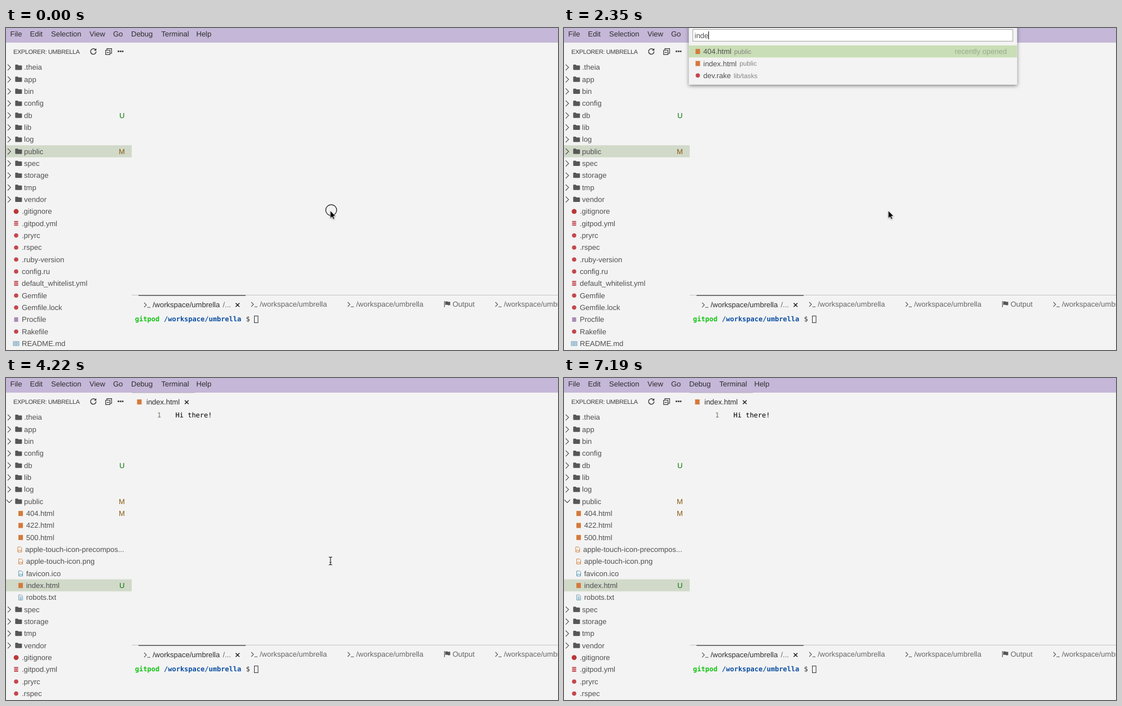
Recreate the animation shown at these times as an HTML page. Size 979 by 572 pixels, loop 7.3 s.

```html
<!DOCTYPE html>
<html lang="en">
<head>
<meta charset="utf-8">
<title>Quick open</title>
<style>
html, body { margin: 0; width: 100%; height: 100%; overflow: hidden; background: #f3f3f3; }
svg { display: block; }
text { font: 13px "Liberation Sans", Arial, sans-serif; fill: #505050; white-space: pre; text-rendering: geometricPrecision; }
.dark { fill: #2e2e2e; }
.grey { fill: #666; }
.small { font-size: 11.7px; fill: #858585; }
.title { font-size: 10.8px; letter-spacing: -.3px; fill: #3c3c3c; }
.mono { font: 12px "DejaVu Sans Mono", "Liberation Mono", monospace; fill: #000; }
.bold { font-weight: bold; }
.hint { fill: #9aa78d; text-anchor: end; }
.group { fill: #a3a3a3; text-anchor: end; }
.line { fill: none; stroke: #444; stroke-width: 1.1; }

.t { animation: 7300ms step-end infinite; }
#ring { animation-name: ring; }
#keys { animation-name: keys; }
#quick { animation-name: quick; }
#holder { animation-name: holder; }
#recent { animation-name: recent; }
#found { animation-name: found; }
#match { animation-name: match; }
#k1 { animation-name: k1; }
#k2 { animation-name: k2; }
#k3 { animation-name: k3; }
#k4 { animation-name: k4; }
#bar { animation-name: bar; }
#closed { animation-name: closed; }
#open { animation-name: open; }
#sel { animation-name: sel; }
#tab { animation-name: tab; }
#code { animation-name: code; }
#caret { animation-name: caret; }
#mouse { animation-name: mouse; }
#arrow { animation-name: arrow; }
#beam { animation-name: beam; }
#hand { animation-name: hand; }

@keyframes ring { 0% { opacity: 1 } 1.23%, 100% { opacity: 0 } }
@keyframes keys { 0% { opacity: 0 } 12.6% { opacity: 1 } 18.76%, 100% { opacity: 0 } }
@keyframes quick { 0% { opacity: 0 } 13.83% { opacity: 1 } 43.56%, 100% { opacity: 0 } }
@keyframes holder { 0% { opacity: 1 } 27.25%, 100% { opacity: 0 } }
@keyframes recent { 0% { opacity: 1 } 34.93%, 100% { opacity: 0 } }
@keyframes found { 0% { opacity: 0 } 34.93% { opacity: 1 } 37.39%, 100% { opacity: 0 } }
@keyframes match { 0% { opacity: 0 } 37.39%, 100% { opacity: 1 } }
@keyframes k1 { 0% { fill-opacity: 0 } 27.25%, 100% { fill-opacity: 1 } }
@keyframes k2 { 0% { fill-opacity: 0 } 29.72%, 100% { fill-opacity: 1 } }
@keyframes k3 { 0% { fill-opacity: 0 } 32.19%, 100% { fill-opacity: 1 } }
@keyframes k4 { 0% { fill-opacity: 0 } 33.83%, 100% { fill-opacity: 1 } }
@keyframes bar {
  0% { opacity: 1; transform: translateX(232px) }
  19.86% { opacity: 0; transform: translateX(232px) }
  27.25% { opacity: 1; transform: translateX(235px) }
  29.72% { opacity: 1; transform: translateX(249px) }
  32.19% { opacity: 1; transform: translateX(256px) }
  33.83% { opacity: 1; transform: translateX(263px) }
  41.09%, 100% { opacity: 0; transform: translateX(263px) }
}
@keyframes closed { 0% { opacity: 1 } 52.6%, 100% { opacity: 0 } }
@keyframes open { 0% { opacity: 0 } 52.6%, 100% { opacity: 1 } }
@keyframes sel { 0% { transform: none } 54.1%, 100% { transform: translateY(149.3px) } }
@keyframes tab { 0% { opacity: 0 } 49.72%, 100% { opacity: 1 } }
@keyframes code { 0% { opacity: 0 } 51.23%, 100% { opacity: 1 } }
@keyframes caret {
  0% { opacity: 0 } 51.23% { opacity: 1 } 57.8% { opacity: 0 } 63.97% { opacity: 1 } 71.78% { opacity: 0 }
  79.04% { opacity: 1 } 85.34% { opacity: 0 } 92.6% { opacity: 1 } 98.49%, 100% { opacity: 0 }
}
@keyframes mouse {
  0% { transform: translate(575.5px, 325px) }
  63.97% { transform: translate(575px, 326px) }
  65.47% { transform: translate(530px, 342px) }
  66.84% { transform: translate(445.5px, 363.5px) }
  68.9% { transform: translate(234.5px, 382px) }
  71.78% { transform: translate(160px, 383px) }
  73.15% { transform: translate(108px, 382px) }
  74.65% { transform: translate(74px, 378px) }
  76.02% { transform: translate(58px, 374px) }
  77.53% { transform: translate(50px, 371px) }
  79.04% { transform: translate(46px, 369px) }
  80.54% { transform: translate(43px, 368px) }
  82.05% { transform: translate(42px, 367px) }
  85.34% { transform: translate(120px, 376px) }
  86.98% { transform: translate(720.5px, 452px) }
  88.9% { transform: translate(872.5px, 518px) }
  92.6%, 100% { transform: translate(887.5px, 556.5px) }
}
@keyframes arrow { 0% { opacity: 1 } 51.23%, 100% { opacity: 0 } }
@keyframes beam { 0% { opacity: 0 } 51.23% { opacity: 1 } 71.78% { opacity: 0 } 86.98% { opacity: 1 } 94.79%, 100% { opacity: 0 } }
@keyframes hand { 0% { opacity: 0 } 71.78% { opacity: 1 } 86.98%, 100% { opacity: 0 } }
</style>
</head>
<body>
<svg width="979" height="572" viewBox="0 0 979 572">
  <defs>
    <filter id="soft" x="-10%" y="-20%" width="120%" height="150%"><feDropShadow dx="0" dy="2" stdDeviation="3" flood-opacity=".5"/></filter>
    <filter id="glow" x="-10%" y="-10%" width="120%" height="120%"><feDropShadow dx="0" dy="0" stdDeviation="1.5" flood-opacity=".5"/></filter>
    <filter id="drop" x="-50%" y="-50%" width="200%" height="200%"><feDropShadow dx="0" dy="1" stdDeviation="1" flood-opacity=".35"/></filter>
    <path id="folder" d="M-6-4q0-1 1-1h3.4L-.2-3.6H5q1 0 1 1v6q0 1-1 1H-5q-1 0-1-1z" fill="#575757"/>
    <path id="shut" class="line" d="M-2.7-5.2 2.5 0l-5.2 5.2"/>
    <path id="down" class="line" d="M-5-2.6 0 2.5l5-5.1"/>
    <circle id="git" r="4.4" fill="#b9383a"/>
    <circle id="ruby" r="3.8" fill="#c4474d"/>
    <rect id="proc" x="-3.5" y="-4" width="7" height="8" fill="#a78ab5"/>
    <rect id="html" x="-4" y="-4.5" width="8" height="9" fill="#d57a3c"/>
    <g id="yml" fill="#c65a60"><rect x="-3.8" y="-4.6" width="7.6" height="2.4" rx="1"/><rect x="-3.8" y="-1.5" width="7.6" height="2.4" rx="1"/><rect x="-3.8" y="1.6" width="7.6" height="2.4" rx="1"/></g>
    <g id="book"><rect x="-5" y="-3.5" width="10" height="7" fill="#cfe1ea" stroke="#6e9fb8"/><path d="M0-3.5v7M-3.5-1.2h2m3 0h2M-3.5 1h2m3 0h2" stroke="#6e9fb8"/></g>
    <path id="image" d="M-3.5-4.5h5l2 2v7h-7zM-3 3.5-1 .5 1 2.2 2.2 1 3 3.5" fill="none"/>
    <use id="img" href="#image" stroke="#d58a4c"/>
    <use id="ico" href="#image" stroke="#5f9dbb"/>
    <path id="txt" d="M-3.5-4.5h5l2 2v7h-7zM-2-1h4M-2 1h4M-2 3h4" fill="none" stroke="#6fa3bd"/>
    <path id="term" d="M0-4 4 0 0 4M5.5 4.3H11" fill="none" stroke="#555" stroke-width="1.1"/>
    <path id="cross" d="M-3.3-3.3 3.3 3.3M3.3-3.3-3.3 3.3" stroke="#1c1c1c" stroke-width="1.5"/>
    <path id="rod" d="M-3-7Q0-7 0-5.5V5.5Q0 7-3 7M3-7Q0-7 0-5.5V5.5Q0 7 3 7M-1.5 2.5h3"/>
  </defs>

  <rect width="979" height="572" fill="#f3f3f3"/>
  <rect width="979" height="26" fill="#c4b7d7"/>
  <g id="menu"></g>

  <text class="title" x="13" y="45.7">EXPLORER: UMBRELLA</text>
  <g fill="none" stroke="#333" stroke-width="1.4">
    <path d="M158.3 38.2a4.9 4.9 0 1 0 1.5 3.6"/>
    <path d="M160.2 36v4.2H156z" fill="#333" stroke="none"/>
    <path d="M176.7 39.5h7.6v7.6h-7.6zM179 39v-2.3h8.3V45H185M178.5 43.3h4" stroke-width="1.2"/>
  </g>
  <path d="M198 40.3h2.8v2.5H198zm3.8 0h2.8v2.5h-2.8zm3.7 0h2.8v2.5h-2.8z" fill="#333"/>

  <rect id="sel" class="t" y="208.4" width="223" height="21.3" fill="#d1d9c9"/>
  <g id="closed" class="t"></g>
  <g id="open" class="t"></g>

  <g id="tab" class="t">
    <rect x="223" y="25.5" width="112" height="1" fill="#b4adbb"/>
    <use href="#html" x="236.5" y="42.5"/>
    <text class="dark" x="249" y="46.7">index.html</text>
    <use href="#cross" x="320.5" y="43"/>
  </g>
  <g id="code" class="t">
    <text class="mono" x="268" y="70" style="fill:#75755f">1</text>
    <text class="mono" x="300.5" y="70">Hi there!</text>
  </g>
  <rect id="caret" class="t" x="301" y="57" width="2" height="18"/>

  <rect x="223" y="474" width="756" height="1" fill="#c3c3c3"/>
  <rect x="235" y="474.5" width="190" height="1.2" fill="#333"/>
  <use href="#term" x="245" y="492"/>
  <text class="dark" x="260" y="495.6">/workspace/umbrella</text>
  <text class="grey" x="384.5" y="495.6">/...</text>
  <use href="#cross" x="410.7" y="492"/>
  <g id="terms"></g>
  <path d="M777 485h1.2v11H777zM779 486q2.2-1 4.4 0t4.4 0v6q-2.2 1-4.4 0t-4.4 0z" fill="#555"/>
  <text class="grey" x="792" y="494.8">Output</text>
  <text class="mono bold" x="228.8" y="520.8" style="fill:#0fc40f">gitpod</text>
  <text class="mono bold" x="280" y="520.8" style="fill:#0b4ea2">/workspace/umbrella</text>
  <text class="mono" x="425.5" y="520.8" style="fill:#333">$</text>
  <rect x="440.5" y="511.5" width="6.5" height="12" fill="none" stroke="#333"/>

  <g id="quick" class="t">
    <g id="recent" class="t"></g>
    <g id="found" class="t"></g>
    <g id="match" class="t"></g>
    <rect x="228.5" y="2.5" width="567.5" height="21" fill="#fff" stroke="#a2a2a2"/>
    <text id="holder" class="t" x="231.5" y="17.5" style="fill:#8a8a8a">Type '?' to get help on the actions you can take from here</text>
    <text x="231.5" y="17.5"><tspan id="k1" class="t">i</tspan><tspan id="k2" class="t">nd</tspan><tspan id="k3" class="t">e</tspan><tspan id="k4" class="t">x</tspan></text>
    <rect id="bar" class="t" y="6" width="1" height="14"/>
  </g>

  <g id="keys" class="t">
    <rect x="404.5" y="217" width="117.5" height="87" rx="13" fill="#0b0b0b" filter="url(#glow)"/>
    <path transform="translate(444.8 263.8) scale(1.02)" d="M-14-7H14A7 7 0 1 0 7-14V14A7 7 0 1 0 14 7H-14A7 7 0 1 0-7 14V-14A7 7 0 1 0-14-7Z" fill="none" stroke="#fdd5fa" stroke-width="5"/>
    <text x="473" y="285.7" style="font:64px 'Open Sans','Noto Sans',sans-serif;fill:#fdd5fa">P</text>
  </g>

  <circle id="ring" class="t" cx="576.8" cy="323.5" r="9.7" fill="none" stroke="#111" stroke-width="1.2"/>
  <g id="mouse" class="t">
    <path id="arrow" class="t" d="M-.3-.5V13L2.8 10.2 5 14.8 7.2 13.8 5.1 9.3H9Z" stroke="#fff" stroke-width=".7" filter="url(#drop)"/>
    <g id="beam" class="t" fill="none">
      <use href="#rod" stroke="#fff" stroke-width="2.4"/>
      <use href="#rod" stroke="#111" stroke-width="1.2"/>
    </g>
    <g id="hand" class="t" stroke="#111" stroke-linejoin="round" filter="url(#drop)">
      <path d="M-1.4 9V1.2Q-1.4 0 0 0T1.4 1.2V6Q1.6 4.9 2.8 5T4 6.2Q4.4 5.3 5.5 5.6T6.5 7Q7 6.3 7.9 6.7T8.5 8V11Q8.5 13 7.4 14.3V16H-.6V14.7L-4.3 9.6Q-4.7 8.3-3.6 8T-1.4 9Z" fill="#fff"/>
      <path d="M1.5 10.5v3M3.7 10.5v3M5.9 10.5v3" fill="none" stroke-width=".8"/>
    </g>
  </g>
</svg>
<script>
const $ = id => document.getElementById(id);
const label = (s, x, y, cls = '') => `<text class="${cls}" x="${x}" y="${y}">${s}</text>`;
const icon = (id, x, y) => `<use href="#${id}" x="${x}" y="${y}"/>`;
const fill = (id, html) => $(id).innerHTML = html;
const pitch = 21.33;

const menu = { File: 7.5, Edit: 42.5, Selection: 80, View: 148, Go: 190, Debug: 222, Terminal: 275.5, Help: 337.5 };
fill('menu', Object.entries(menu).map(([s, x]) => label(s, x, 15, 'dark')).join(''));
fill('terms', [435, 606, 868].map(x => icon('term', x, 491) + label('/workspace/umbrella', x + 15, 494.8, 'grey')).join(''));

// Explorer rows: [icon, name, badge]
const dirs = names => names.split(' ').map(n => ['folder', n]);
const head = dirs('.theia app bin config db lib log public');
head[4].push('U');
head[7].push('M');
const tail = dirs('spec storage tmp vendor').concat([
  ['git', '.gitignore'], ['yml', '.gitpod.yml'], ['ruby', '.pryrc'], ['ruby', '.rspec'],
  ['ruby', '.ruby-version'], ['ruby', 'config.ru'], ['yml', 'default_whitelist.yml'],
  ['ruby', 'Gemfile'], ['ruby', 'Gemfile.lock'], ['proc', 'Procfile'], ['ruby', 'Rakefile'], ['book', 'README.md']
]);
const inner = [
  ['html', '404.html', 'M'], ['html', '422.html'], ['html', '500.html'],
  ['img', 'apple-touch-icon-precompos...'], ['img', 'apple-touch-icon.png'],
  ['ico', 'favicon.ico'], ['html', 'index.html', 'U'], ['txt', 'robots.txt']
];
const badges = { U: [201, '#08790a'], M: [200, '#8a5a10'] };

function tree(rows, isOpen) {
  return rows.slice(0, 24).map((row, i) => {
    const [kind, name, badge] = row;
    const y = 69.7 + i * pitch, base = y + 4.6;
    const dir = kind === 'folder', nested = inner.includes(row);
    const inset = name.endsWith('...') ? -1.7 : 0;
    let out = '';
    if (dir) out += isOpen && name === 'public' ? icon('down', 5.8, y) : icon('shut', 5.7, y + .3);
    out += icon(kind, dir ? 22.3 : nested ? 26 + inset : 18, y + .3);
    out += label(name, dir ? 32 : nested ? 35.7 + inset : 28, base);
    if (badge) {
      const [x, color] = badges[badge];
      out += `<text x="${x}" y="${base}" style="fill:${color}">${badge}</text>`;
    }
    return out;
  }).join('');
}
fill('closed', tree([...head, ...tail], false));
fill('open', tree([...head, ...inner, ...tail], true));

// Result rows: [icon, name, folder]
const recent = [['html', '404.html', 'public'], ['html', 'index.html', 'public'], ['ruby', 'dev.rake', 'lib/tasks']];
const found = [
  recent[1],
  ...['pages', 'users', 'items', 'posts', 'lists'].map(d => ['html', 'index.html.erb', 'app/views/' + d]),
  ['ruby', 'add_index.rb', 'db/migrate'], ['ruby', 'index_spec.rb', 'spec/features'], ['html', 'index.html.erb', 'app/views/home']
];
const pen = document.createElement('canvas').getContext('2d');
pen.font = '13px "Liberation Sans", Arial, sans-serif';

function list(rows) {
  const h = 36.5 + rows.length * pitch;
  let out = `<rect x="221.5" y="-10" width="582" height="${h + 10}" fill="#f3f3f3" filter="url(#soft)"/>
    <rect x="221.5" y="31" width="582" height="21.3" fill="#c9deb6"/>`;
  rows.forEach(([kind, name, dir], i) => {
    const y = 41.7 + i * pitch;
    out += icon(kind, 237.3, y) + label(name, 247, y + 4.5)
      + label(dir, 252 + pen.measureText(name).width, y + 4.3, 'small');
  });
  out += label('recently opened', 785.5, 46, 'hint');
  if (rows.length > 3) out += label('file results', 785.5, 67.3, 'group');
  return out;
}
fill('recent', list(recent));
fill('found', list(found));
fill('match', list([recent[1]]));
</script>
</body>
</html>
```
